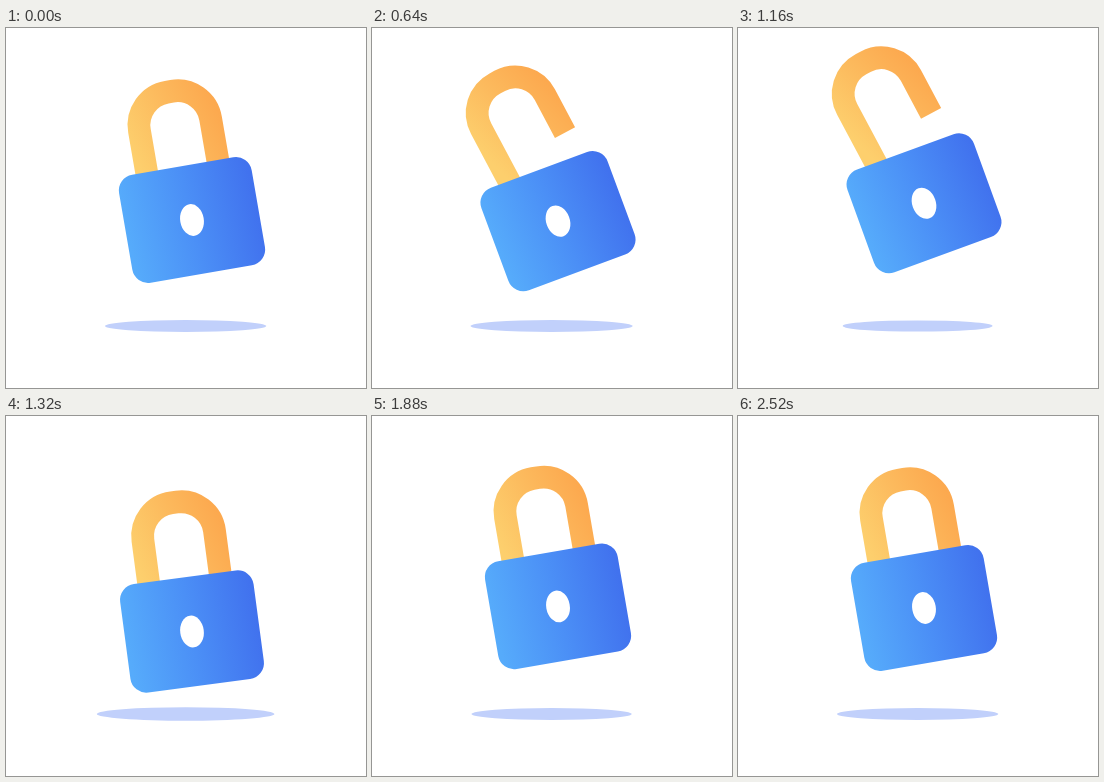
Animation, 360 px wide and 360 px high, one loop 2560 ms. Source, as an HTML page with a canvas:

```html
<!DOCTYPE html>
<html lang="en">
<head>
<meta charset="utf-8">
<title>Padlock</title>
<style>
  html, body { margin: 0; width: 100%; height: 100%; overflow: hidden; background: #fff; }
  canvas { display: block; width: 360px; height: 360px; }
</style>
</head>
<body>
<canvas id="stage" width="360" height="360"></canvas>
<script>
const ctx = document.getElementById('stage').getContext('2d');
const LOOP = 2560, STEP = 40;
const REST = 9.8, OPEN = 21.3, IMPACT = 7.6;

const inOut = u => (1 - Math.cos(Math.PI * u)) / 2;
const softOut = u => (u + Math.sin(u * Math.PI / 2)) / 2;
const quickStart = u => u ** 0.7;
const slowStart = u => u * u;
const rad = deg => deg * Math.PI / 180;

// keys: [time, value, easing into this key]
function track(keys, t) {
  for (let i = 1; i < keys.length; i++) {
    const [t0, v0] = keys[i - 1], [t1, v1, ease = inOut] = keys[i];
    if (t < t1) return t <= t0 ? v0 : v0 + (v1 - v0) * ease((t - t0) / (t1 - t0));
  }
  return keys[keys.length - 1][1];
}

// dip, jump, drop, rebound, settle
const height = [[160, 192], [800, 194, slowStart], [1120, 171], [1320, 215.5], [1780, 190.3], [2440, 192]];
const tilt = [[160, REST], [720, OPEN, softOut], [1120, OPEN], [1320, IMPACT], [1780, REST]];
const unlock = [[160, 0], [760, 1, quickStart], [1120, 1], [1320, 0]];

function gradient(x0, y0, x1, y1, ...colors) {
  const g = ctx.createLinearGradient(x0, y0, x1, y1);
  colors.forEach((c, i) => g.addColorStop(i / (colors.length - 1), c));
  return g;
}

function ellipse(x, y, rx, ry, color) {
  ctx.fillStyle = color;
  ctx.beginPath();
  ctx.ellipse(x, y, rx, ry, 0, 0, Math.PI * 2);
  ctx.fill();
}

function shackle(open) {
  const r = 36.1, corner = 33.4, top = -35.3;
  ctx.save();
  ctx.translate(-0.5 - 4 * open, -95 - 25 * open);
  ctx.rotate(rad(-9 * open));
  ctx.strokeStyle = gradient(-46, 24, 46, -4, '#fdcf6d', '#fcbb5e', '#fca94f');
  ctx.lineWidth = 22.8;
  ctx.beginPath();
  ctx.moveTo(-r, 85);
  ctx.arcTo(-r, top, 0, top, corner);
  ctx.arcTo(r, top, r, 0, corner);
  ctx.lineTo(r, 41);
  ctx.stroke();
  ctx.restore();
}

function body() {
  ctx.fillStyle = gradient(-66, 4, 66, -4, '#56abfb', '#4b8ff6', '#4172ee');
  ctx.beginPath();
  ctx.roundRect(-67.3, -54.7, 134.6, 109.4, 16);
  ctx.fill();
  ellipse(0, 0, 11.8, 16, '#fff');
}

function draw(time) {
  const t = Math.floor((time % LOOP) / STEP) * STEP;
  const y = track(height, t);
  ctx.fillStyle = '#fff';
  ctx.fillRect(0, 0, 360, 360);

  const rx = 80.7 + (y - 192) * 0.345;
  ellipse(179.6, 298, rx, rx * 0.075, '#c1d0fb');

  ctx.save();
  ctx.translate(186, y);
  ctx.rotate(rad(-track(tilt, t)));
  shackle(track(unlock, t));
  body();
  ctx.restore();
}

function frame() {
  draw(performance.now());
  requestAnimationFrame(frame);
}
frame();
</script>
</body>
</html>
```
